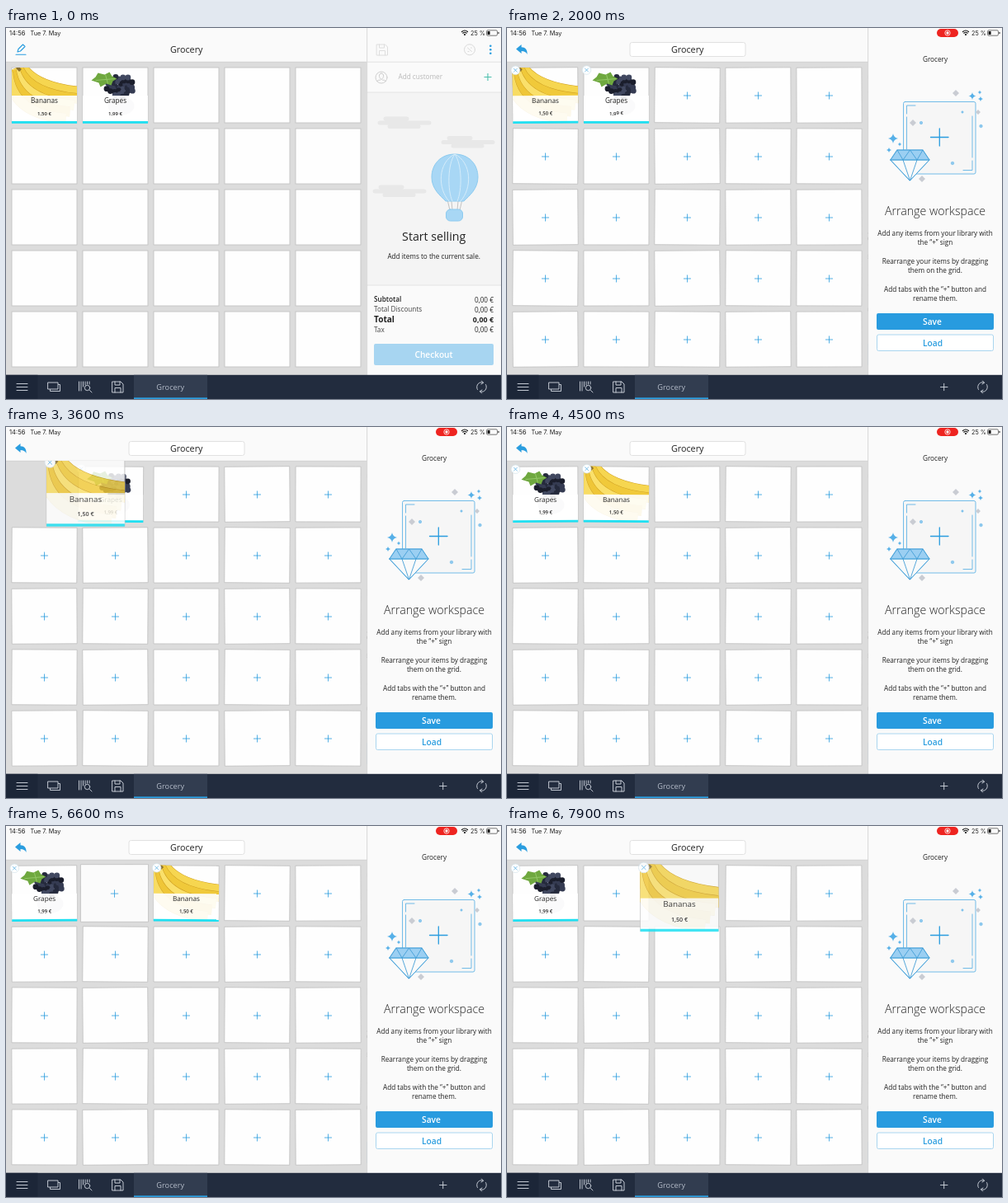
Write an HTML page that moves like this. It is 600x450 px and loops after 8000 ms.

```html
<!DOCTYPE html>
<html lang="en">
<head>
<meta charset="utf-8">
<title>Arrange workspace</title>
<style>
  html, body { margin: 0; width: 100%; height: 100%; overflow: hidden; background: #fafafa; }
  svg { display: block; width: 100vw; height: 100vh; }
  text { font: 8.2px "Open Sans", sans-serif; fill: #222; }
  .mid { text-anchor: middle; }
  .end { text-anchor: end; }
  .semi { font-weight: 600; }
  .head { font-size: 14.2px; }
  .btn { font-size: 10.2px; font-weight: 600; text-anchor: middle; fill: #fff; }
  .status text { font: 7.6px Inter, sans-serif; }
  .line { fill: none; stroke-linecap: round; stroke-linejoin: round; }
  .blue { stroke: #2a9ddf; }
  .bar { stroke: #d3d9e1; stroke-width: .9; }
</style>
</head>
<body>
<svg viewBox="0 0 600 450" xmlns="http://www.w3.org/2000/svg">
  <defs>
    <clipPath id="gridClip"><rect y="41" width="437.5" height="380"/></clipPath>
    <clipPath id="sideClip"><rect x="437.5" width="162.5" height="421"/></clipPath>
    <clipPath id="tileClip"><rect x="-39.5" y="-33.5" width="79" height="67"/></clipPath>
    <linearGradient id="edge"><stop offset="0" stop-color="#000" stop-opacity="0"/><stop offset="1" stop-color="#000" stop-opacity=".12"/></linearGradient>
    <path id="floppy" class="line" d="M0 0H10L13 3V13H0ZM3 0V4H9V0M3 13V7.5H10V13"/>
    <g id="cloud" class="line" stroke="#e8e8e8" stroke-width="5">
      <path d="M460 110H486M453 115H513M465 119.500H500"/>
    </g>
    <path id="star" d="M0-6Q.8-.8 6 0Q.8.8 0 6Q-.8.8-6 0Q-.8-.8 0-6Z"/>
  </defs>

  <rect width="600" height="450" fill="#fafafa"/>
  <rect y="41" width="437.500" height="380" fill="#dcdcdc"/>
  <path d="M0 41.200H437" stroke="#cfcfcf" stroke-width=".7"/>

  <g id="pencil" class="line blue" stroke-width="1.100">
    <path d="M14 29L15 25.500L20.500 20L23 22.500L17.500 28Z M12 32.300H24"/>
  </g>
  <path id="undo" d="M11 25.500L17.500 20V23.200C22 23.200 25 26.500 24.500 32C23 29 21 28 17.500 28V31Z" fill="#2a9ddf"/>
  <rect id="field" x="149" y="17.500" width="140" height="17" rx="2.500" fill="#fff" stroke="#dedede" stroke-width=".9"/>
  <text class="mid" x="218.700" y="30" style="font-size:10.8px">Grocery</text>

  <g id="grid" clip-path="url(#gridClip)"></g>

  <g clip-path="url(#sideClip)">
    <g id="cart">
      <rect x="437" y="41" width="212" height="380" fill="#fafafa"/>
      <rect x="437" y="78" width="212" height="234" fill="#f4f4f4"/>
      <path d="M437 41.200H649M437 78H649M437 312H649" stroke="#dedede" stroke-width=".8"/>
      <g class="line" stroke="#cfcfcf">
        <circle cx="455" cy="60" r="7"/>
        <path d="M455 55C451 55 452 61 455 62.500C458 61 459 55 455 55M449.500 64.500Q452 62.500 453.500 63M460.500 64.500Q458 62.500 456.500 63"/>
      </g>
      <text x="475.500" y="62.300" style="fill:#b9b9b9">Add customer</text>
      <path d="M579.500 59.500H588.500M584 55V64" stroke="#4bbfac" stroke-width="1.100"/>
      <use href="#cloud"/><use href="#cloud" x="77" y="23.500"/><use href="#cloud" x="-6" y="83"/>
      <g class="line" stroke="#8ccbf0">
        <path d="M535 208L538 221M540 210L541 221M548 210L547 221M553 208L550 221" stroke="#c3c3c3"/>
        <path d="M544 153C526 153 516 166 516 181C516 195 526 203 533 210H555C562 203 572 195 572 181C572 166 562 153 544 153Z" fill="#a8d7f5"/>
        <path d="M544 153C523 163 523 195 537 210M544 153C535 165 535 197 541 210M544 153C553 165 553 197 547 210M544 153C565 163 565 195 551 210" stroke="#d5ecfa"/>
        <rect x="533.500" y="220" width="20" height="14" rx="5" fill="#a8d7f5"/>
      </g>
      <text class="mid head" x="518.700" y="258">Start selling</text>
      <text class="mid" x="518.700" y="280">Add items to the current sale.</text>
      <text class="semi" x="446" y="332">Subtotal</text><text class="end" x="591" y="333">0,00 €</text>
      <text x="446" y="344" style="fill:#444">Total Discounts</text><text class="end" x="591" y="345">0,00 €</text>
      <text x="446" y="357" style="font-size:10.1px;font-weight:700">Total</text>
      <text class="end" x="591" y="357" style="font-size:8.900px;font-weight:700">0,00 €</text>
      <text x="446" y="369" style="fill:#444">Tax</text><text class="end" x="591" y="369">0,00 €</text>
      <rect x="446" y="383" width="145" height="26" rx="2" fill="#a7d5f1"/>
      <text class="btn" x="518.500" y="400">Checkout</text>
    </g>
    <rect id="dim" x="437" y="41" width="163" height="380"/>
    <g id="cartNav">
      <use href="#floppy" x="449.500" y="20" stroke="#dedede"/>
      <g class="line" stroke="#dadada"><circle cx="562" cy="26.300" r="6.500"/><path d="M559.500 24L564.500 28.500M560 28.500H561M563.500 24H564.500"/></g>
      <g fill="#2a9ddf"><circle cx="587.300" cy="21.800" r="1.300"/><circle cx="587.300" cy="26.300" r="1.300"/><circle cx="587.300" cy="30.800" r="1.300"/></g>
    </g>
    <g id="panel">
      <rect x="432" width="6" height="421" fill="url(#edge)"/>
      <rect x="438" width="163" height="421" fill="#fafafa"/>
      <text class="mid" x="519" y="41">Grocery</text>
      <g class="line" stroke="#62b5e6" stroke-width=".9">
        <rect x="480.500" y="89.500" width="87.500" height="87.500" rx="2" fill="#f6f6f6"/>
        <path d="M484.500 104V94H495M484.500 108V147M564 161V172.500H553M564 107V157"/>
        <path class="blue" d="M513.500 132.500H535M524.300 122V143" stroke-width="1.300"/>
        <path d="M465 160L488.500 185L512 160Z" fill="#fafafa"/>
        <path d="M473 148H504L512 160H465Z" fill="#9bcff2"/>
        <path stroke="#459fd6" d="M465 160H512L488.500 185ZL473 148H504L512 160M473 148L480 160L488.500 148L497 160L504 148M480 160L488.500 185L497 160"/>
      </g>
      <g fill="#56b0e8">
        <use href="#star" transform="translate(468 134)"/>
        <use href="#star" transform="translate(463 148) scale(.5)"/>
        <use href="#star" transform="translate(476 141) scale(.4)"/>
        <use href="#star" transform="translate(564 82.500) scale(.75)"/>
        <use href="#star" transform="translate(574 86) scale(.5)"/>
        <use href="#star" transform="translate(573 78) scale(.4)"/>
      </g>
      <g fill="#c9ccd3">
        <path d="M544 75L548 79L544 83L540 79ZM492 111L496 115L492 119L488 115ZM503 179L507 183L503 187L499 183ZM571 99L574 102L571 105L568 102Z"/>
      </g>
      <g fill="#8fc9ee" stroke="#62b5e6" stroke-width=".5"><circle cx="502" cy="115" r="1.700"/><circle cx="540" cy="164" r="1.800"/><circle cx="574.500" cy="119" r="1.800"/><circle cx="552" cy="102" r="1.200"/></g>
      <text class="mid head" x="519" y="227" style="font-weight:300">Arrange workspace</text>
      <g class="mid">
        <text x="519" y="251.500">Add any items from your library with</text>
        <text x="519" y="262.500">the “+” sign</text>
        <text x="519" y="286">Rearrange your items by dragging</text>
        <text x="519" y="297">them on the grid.</text>
        <text x="519" y="320">Add tabs with the “+” button and</text>
        <text x="519" y="331">rename them.</text>
      </g>
      <rect x="448" y="346" width="142" height="20" rx="2" fill="#289bdf"/>
      <text class="btn" x="515.500" y="359.500">Save</text>
      <rect x="448.500" y="372" width="141" height="19.500" rx="2" fill="#fff" stroke="#a9d5ef"/>
      <text class="btn" x="516" y="385.500" style="fill:#2a9ddf">Load</text>
    </g>
  </g>
  <path d="M437.600 0V421" stroke="#d6d6d6" stroke-width=".9"/>

  <g class="status">
    <text x="4" y="9">14:56</text><text x="29.500" y="9" style="font-size:7.3px">Tue 7. May</text>
    <g id="record">
      <rect x="521" y="1" width="26" height="10" rx="5" fill="#ee2420"/>
      <circle cx="534" cy="6" r="3.200" fill="none" stroke="#fff" stroke-width=".8"/><circle cx="534" cy="6" r="1.700" fill="#fff"/>
    </g>
    <path class="line" d="M552.500 4.500Q556 1.500 559.500 4.500M553.800 6.200Q556 4.300 558.200 6.200" stroke="#111" stroke-width="1.200"/>
    <circle cx="556" cy="8" r="1.100"/>
    <text x="563" y="9" style="font-size:7.3px">25 %</text>
    <rect x="582.500" y="2.800" width="13" height="6.400" rx="1.500" fill="none" stroke="#555" stroke-width=".8"/>
    <path d="M583.600 4H586.600V8H583.600ZM596.500 5H597.500V7H596.500Z" fill="#111"/>
  </g>

  <rect y="420.800" width="600" height="29.200" fill="#222c3e"/>
  <rect y="420.800" width="38.500" height="29.200" fill="#1c2638"/>
  <rect x="155" y="420.800" width="89" height="29.200" fill="#323d50"/>
  <rect x="155" y="448.300" width="89" height="1.700" fill="#2a9ddf"/>
  <g class="line bar">
    <path d="M13 431.500H26M13 435.500H26M13 439.500H26"/>
    <path d="M51 430H63V438H51ZM63.500 432.500H65.500V440.500H53.500V438.500"/>
    <path d="M88.500 429V440M91 429V440M93.500 429V435M96 429V433M98.500 429V432M101 429V432M101.500 439.500L104 442"/>
    <circle cx="98.500" cy="436.500" r="3.200"/>
    <use href="#floppy" x="129" y="429"/>
    <path id="addTab" d="M525.500 435.500H534M529.700 431.300V439.700"/>
    <path d="M571.500 438.500A5.700 5.700 0 0 1 576 429.800L578.500 430.300M581.500 432.500A5.700 5.700 0 0 1 577 441.200L574.500 440.700M576.500 428L578.500 430.300L576 432M576.500 443L574.500 440.700L577 439"/>
  </g>
  <text class="mid" x="199.200" y="439" style="font-size:9.2px;fill:#b4bcc9">Grocery</text>
</svg>

<script>
const LOOP = 8000;
const $ = id => document.getElementById(id);
const range = n => [...Array(n).keys()];

// Each fruit hangs from the stem at the top left and sweeps out to the right.
function bananas() {
  const tones = ['#f6d650', '#f0c93a', '#fae06a', '#efc637', '#f8dc63'];
  const fruit = tones.map((tone, k) => {
    const d = `M${-28 - 4 * k} ${-36 + 2 * k}Q${-12 - 7 * k} ${-9 + 8 * k} ${46 - 5 * k} ${-4 + 8 * k}`;
    return `<path d="${d}" stroke="#cfa023" stroke-width="12.500"/><path d="${d}" stroke="${tone}" stroke-width="11.500"/>`;
  }).join('');
  return `<g fill="none">${fruit}<path d="M-33-34L-29-30" stroke="#8a7030" stroke-width="4"/></g>`;
}

function grapes() {
  const berries = range(34).map(i => {
    const r = Math.sqrt((i + .5) / 34), a = i * 2.4;
    const tone = ['#252a3c', '#353b52', '#1b1e2c', '#414860'][i % 4];
    return `<circle cx="${6 + 18 * r * Math.cos(a)}" cy="${-11 + 13 * r * Math.sin(a)}" r="3.4" fill="${tone}"/>`;
  }).join('');
  return `<ellipse cx="7" cy="13" rx="16" ry="11" fill="#cfd0d6"/>${berries}
    <path d="M-29-18L-24-22L-21-27L-13-25L-7-28L-4-23L2-20L-3-17L-5-12L-11-14L-18-10L-20-15Z" fill="#6fa83f"/>
    <path d="M-24-18L0-20M-12-25L-9-14" stroke="#92c766" fill="none"/>`;
}

const plus = '<path class="edit blue" d="M-4.500 .5H4.500M0-4V5" stroke-width=".8"/>';

function product(name, price, photo) {
  return `<g clip-path="url(#tileClip)">${photo}
      <rect x="-39.5" y=".5" width="79" height="33" fill="#fff" opacity=".9"/></g>
    <rect x="-39.500" y="31.500" width="79" height="2.800" fill="#1fe0f2"/>
    <text class="mid" y="9.500">${name}</text>
    <text class="mid semi" y="24" style="font-size:6px">${price}</text>
    <g class="edit"><circle cx="-36" cy="-30.500" r="5.300" fill="#fff" stroke="#d3e2ea" stroke-width=".7"/>
      <path class="line" stroke="#62b5e6" d="M-38-32.500L-34-28.500M-34-32.500L-38-28.500" stroke-width=".8"/></g>`;
}

const inner = i => i === 0 ? product('Bananas', '1,50 €', bananas())
  : i === 1 ? product('Grapes', '1,99 €', grapes()) : plus;

const grid = $('grid');
const tileIds = range(25).reverse();
grid.innerHTML = tileIds.map(i => `<g id="tile${i}">
  <rect x="-39.500" y="-33.500" width="79" height="67" fill="#fefefe" stroke="#c3c3c3" stroke-width=".9"/>${inner(i)}</g>`).join('');
const edits = document.querySelectorAll('.edit');

// Piecewise-linear track of [time, value] points.
function track(t, points) {
  const n = points.findIndex(p => p[0] > t);
  if (n === 0) return points[0][1];
  if (n < 0) return points[points.length - 1][1];
  const [t0, a] = points[n - 1], [t1, b] = points[n];
  return a + (b - a) * (t - t0) / (t1 - t0);
}

const still = { dx: 0, dy: 0, lift: 0 };
function pose(i, t) {
  if (i === 0) return {
    dx: track(t, [[2900, 0], [3200, 8], [3600, 50], [3900, 84], [4200, 88], [4400, 86], [5900, 86], [6000, 100], [6100, 150], [6200, 168], [6300, 172], [7600, 172], [7900, 162.5]]),
    dy: track(t, [[2900, 0], [3600, -2], [4200, -1], [4400, 0], [7600, 0], [7900, 5.5]]),
    lift: track(t, [[2700, 0], [2800, .25], [2900, .75], [3000, 1], [4200, 1], [4400, 0], [7300, 0], [7500, 1]])
  };
  if (i === 1) return {
    ...still, dx: track(t, [[3500, 0], [3600, -5.5], [3700, -45], [3800, -76], [3900, -86]])
  };
  if (i === 2) return {
    dx: track(t, [[5100, 0], [5400, 16], [5600, 8], [6000, -60], [6200, -86], [6500, -88], [6700, -86]]),
    dy: track(t, [[5100, 0], [5400, -4.5], [6000, -2], [6500, 0]]),
    lift: track(t, [[4900, 0], [5100, 1], [6450, 1], [6600, .2], [6700, 0]])
  };
  return still;
}

function placeTile(i, t) {
  const { dx, dy, lift } = pose(i, t);
  const x = 46.5 + 86 * (i % 5) + dx, y = 81.5 + 74 * Math.floor(i / 5) + dy;
  const sway = t < 1700 ? 0 : .45 * Math.sin(t * Math.PI / 130 + i * 1.9) * (1 - lift);
  const tile = $('tile' + i);
  tile.setAttribute('transform', `translate(${x} ${y}) rotate(${sway}) scale(${1 + .2 * lift})`);
  tile.setAttribute('opacity', 1 - (i === 2 ? .32 : .16) * lift);
  if (lift > 0) grid.append(tile); // a dragged tile floats above the rest
}

function shift(id, x) { $(id).setAttribute('transform', `translate(${x} 0)`); }
function fade(id, opacity) { $(id).setAttribute('opacity', opacity); }

function draw(t) {
  const editing = t >= 1300 ? 1 : 0;
  const push = track(t, [[1300, 0], [1400, .36], [1500, .72], [1600, .91], [1700, .98], [1800, 1]]);
  edits.forEach(e => e.setAttribute('opacity', editing));
  ['field', 'addTab'].forEach(id => fade(id, editing));
  fade('pencil', 1 - editing);
  fade('undo', track(t, [[1300, 0], [1400, .42], [1600, 1]]));
  fade('record', t >= 300 ? 1 : 0);
  shift('cart', -49 * push);
  shift('cartNav', -162 * push);
  fade('cartNav', 1 - push);
  fade('dim', .1 * push);
  shift('panel', 162 * (1 - push));
  fade('panel', push > 0 ? 1 : 0);
  tileIds.forEach(i => placeTile(i, t));
}

const start = performance.now();
function tick() {
  const t = (performance.now() - start) % LOOP;
  draw(Math.floor(t / 100) * 100);
  requestAnimationFrame(tick);
}
tick();
</script>
</body>
</html>
```
